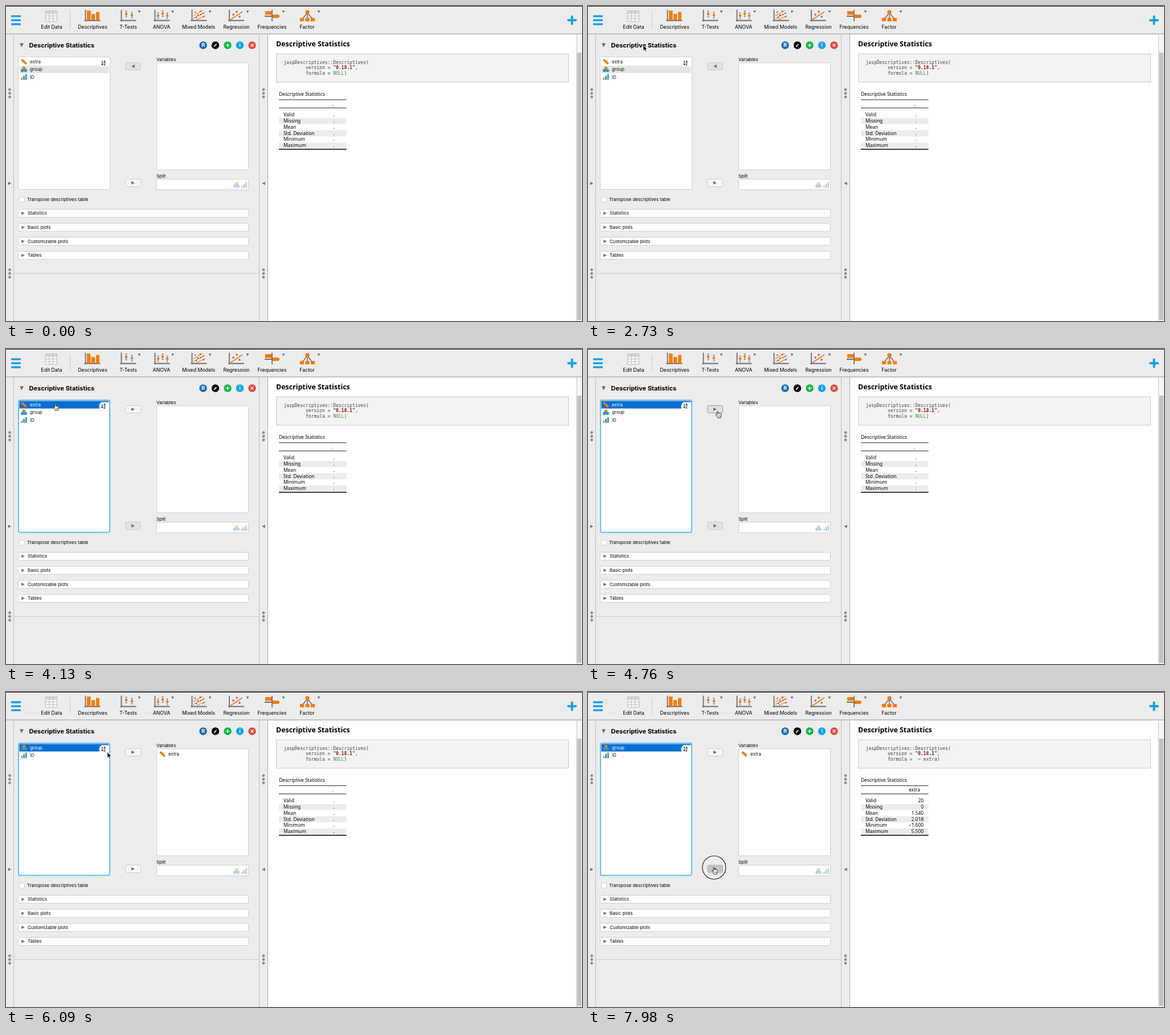
These frames come from a looping animation (1011 px wide and 554 px high, 8000 ms). An HTML page:

```html
<!DOCTYPE html>
<html lang="en">
<head>
<meta charset="utf-8">
<style>
  html, body { margin: 0; width: 100%; height: 100%; overflow: hidden; background: #ececec; }
  svg { display: block; }
  text { white-space: pre; }
  .ui { font: 7.9px Inter, sans-serif; }
  .tool { font: 8.8px Inter, sans-serif; text-anchor: middle; }
  .title { font: 700 11px Inter, sans-serif; }
  .out { font: 8.4px "Noto Sans", sans-serif; }
  .head { font: 700 12.4px "Noto Sans", sans-serif; }
  .code { font: 8px "DejaVu Sans Mono", monospace; fill: #444; }
  .num { text-anchor: end; }
</style>
</head>
<body>
<svg id="stage" width="1011" height="554" viewBox="0 0 1011 554"></svg>
<script>
const ORANGE = '#f57c0a', BLUE = '#14a1e3', GREY = '#6e6e6e';

const rect = (x, y, w, h, fill, extra = '') =>
  `<rect x="${x}" y="${y}" width="${w}" height="${h}" fill="${fill}" ${extra}/>`;
const box = (x, y, w, h, fill = '#fff', stroke = '#cfcfcf', r = 2) =>
  rect(x + .5, y + .5, w - 1, h - 1, fill, `stroke="${stroke}" rx="${r}"`);
const path = (d, stroke, width = 1, fill = 'none') =>
  `<path d="${d}" stroke="${stroke}" stroke-width="${width}" fill="${fill}"/>`;
const dot = (x, y, r, fill) => `<circle cx="${x}" cy="${y}" r="${r}" fill="${fill}"/>`;
const text = (x, y, s, cls = 'ui', extra = '') => `<text x="${x}" y="${y}" class="${cls}" ${extra}>${s}</text>`;
const group = (x, y, body, extra = '') => `<g transform="translate(${x} ${y})" ${extra}>${body}</g>`;
const fillPath = (d, fill) => path(d, 'none', 0, fill);
const right = (x, y, s = 3) => fillPath(`M${x - s} ${y - s}l${2 * s} ${s}l${-2 * s} ${s}z`, GREY);
const left = (x, y, s = 3) => fillPath(`M${x + s} ${y - s}l${-2 * s} ${s}l${2 * s} ${s}z`, GREY);
const down = (x, y, s) => fillPath(`M${x - s} ${y - s}h${2 * s}l${-s} ${2 * s}z`, GREY);

// Variable type icons, centred on the origin
const icons = {
  scale: group(0, 0, rect(-5.5, -1.9, 11, 3.8, ORANGE, 'rx=".5"') +
    path('M-3 -1.9v1.6M-1 -1.9v1.6M1 -1.9v1.6M3 -1.9v1.6', '#b85400', .6), 'transform-origin="0 0" style="rotate:42deg"'),
  nominal: dot(0, -2, 2.9, ORANGE) + dot(-2.6, 2, 2.8, '#57849f') + dot(2.6, 2, 2.8, BLUE),
  ordinal: rect(-5, 1, 2.6, 4, ORANGE) + rect(-1.4, -2, 2.8, 7, '#57849f') + rect(2.3, -5, 2.8, 10, BLUE)
};
const kinds = { extra: 'scale', group: 'nominal', ID: 'ordinal' };
const item = (x, y, name, color = '#111') =>
  group(x, y, icons[kinds[name]]) + text(x + (x < 100 ? 10.5 : 11), y + 2.9, name, 'ui', `fill="${color}"`);

// Toolbar
const axes = (x) => path(`M${x} 6.5V27M${x - 2} 25.5h28`, GREY, 1.8);
const errorBar = (x, y) => path(`M${x} ${y - 5}v10M${x - 1.5} ${y - 5}h3M${x - 1.5} ${y + 5}h3`, GREY, 1) + dot(x, y, 2.3, ORANGE);
const plusMark = (x, y) => path(`M${x - 2} ${y}h4M${x} ${y - 2}v4`, '#c0392b', 1.1);
const tools = [
  [80, 'Edit Data'], [152, 'Descriptives'], [214.5, 'T-Tests', 234], [273, 'ANOVA', 292.5],
  [338, 'Mixed Models', 358], [404.5, 'Regression', 424], [467, 'Frequencies', 487], [528.5, 'Factor', 549]
];
const toolbar =
  rect(0, 0, 1011, 49, '#ececec') + rect(0, 0, 1011, 1, '#222') + rect(0, 48.5, 1011, 1.2, '#a6a6a6') +
  path('M10.5 18h14M10.5 25h14M10.5 32h14', BLUE, 3.6).replace('/>', ' stroke-linecap="round"/>') +
  path('M987 25h13M993.5 18.5v13', BLUE, 4).replace('/>', ' stroke-linecap="round"/>') +
  path('M112.5 10v29', '#cbcbcb') +
  rect(70, 8.5, 19, 18.5, '#f8f8f8') + rect(70, 8.5, 19, 4, '#d8d8d8') +
  path('M69.5 8.5h20v18.5h-20zM69.5 13h20M69.5 17.5h20M69.5 22h20M76 8.5v18.5M82.5 8.5v18.5', '#bdbdbd', 1) +
  axes(139.5) + rect(142, 8, 6.5, 17, ORANGE) + rect(150, 14, 6, 11, ORANGE) + rect(158, 10.5, 6, 14.5, ORANGE) +
  axes(202.5) + errorBar(211, 14) + errorBar(221, 16) +
  axes(261.5) + errorBar(267, 17) + errorBar(275, 13.5) + errorBar(283, 17) +
  axes(326.5) + path('M329 17l16-9M329 22l20-11M334 24l16-7', ORANGE, 1.1) +
  path('M331 11h2M336 16h2M341 15h2M346 19h2M333 20h2M340 9h2M345 13h2', '#c0392b', 1.8) +
  axes(392) + path('M394 24l21-14', ORANGE, 1.8) + plusMark(399, 15) + plusMark(405, 10) + plusMark(410, 19) +
  path('M467 6.5v20.5M454 18h26', GREY, 1.8) + rect(455, 9, 11, 6.5, ORANGE) + rect(468, 15, 11, 6, ORANGE) +
  path('M529 12l-9 11M529 12v11M529 12l9 11', GREY, 1.6) + dot(529, 11, 3.7, ORANGE) +
  [516, 525.5, 535].map(x => rect(x, 21, 7, 6, ORANGE)).join('') +
  tools.map(([x, name, arrow]) => text(x, 39.5, name, 'tool') + (arrow ? down(arrow, 10.2, 2.3) : '')).join('');

// Left-hand form
const badge = (x, fill, mark) => dot(x, 69, 6.7, fill) + mark;
const letter = (x, s) => text(x, 72.4, s, 'title', 'fill="#fff" text-anchor="middle" style="font-size:9.5px"');
const grip = (x) => [147, 153.5, 160, 464, 470.5, 477].map(y => dot(x, y, 2.4, '#8e8e8e')).join('');
const form =
  path('M13.5 50V554M444.5 50V554', '#bdbdbd') + path('M459.5 50V554', '#a8a8a8') +
  grip(6.5) + grip(452) + right(6.5, 312, 2.7) + left(452, 312, 2.7) +
  down(27.5, 69, 3.5) + text(40.5, 73, 'Descriptive Statistics', 'title') +
  badge(346, '#1268b3', letter(346, 'R')) +
  badge(367.5, '#000', path('M365.2 71.4l4.2-4.4', '#fff', 1.8)) +
  badge(389, '#00b53f', path('M385.5 69h7M389 65.5v7', '#fff', 1.7)) +
  badge(410.5, '#0aa2f5', letter(410.5, 'i')) +
  badge(432, '#e0483a', path('M429.5 66.5l5 5M434.5 66.5l-5 5', '#fff', 1.3)) +
  text(264, 96.8, 'Variables') + box(264, 99.5, 162, 189) +
  text(264, 301.5, 'Split') + box(264, 304, 162, 19.5) +
  group(404.5, 315, icons.nominal, 'opacity=".4"') + group(418, 315, icons.ordinal, 'opacity=".4"') +
  box(23, 335.5, 10, 10) + text(37, 343.2, 'Transpose descriptives table') +
  ['Statistics', 'Basic plots', 'Customizable plots', 'Tables'].map((name, i) => {
    const y = 364.5 + i * 24.7;
    return box(21, y - 7.5, 405, 15) + right(30, y, 2.8) + text(38, y + 2.8, name);
  }).join('') +
  path('M14 470.5H444', '#cfcfcf');

// Results page
const labels = ['Valid', 'Missing', 'Mean', 'Std. Deviation', 'Minimum', 'Maximum'];
const values = ['20', '0', '1.540', '2.018', '−1.600', '5.500'];
const rowY = (i) => 194.4 + i * 10.75;
const page =
  rect(460, 50, 541, 504, '#fff') + rect(1001, 50, 10, 504, '#f4f4f4') + path('M1001.5 50V554', '#c9c9c9') +
  rect(1002.5, 82, 7.5, 470, '#c2c2c2') +
  text(474, 70.8, 'Descriptive Statistics', 'head') +
  box(474, 83.5, 514, 51, '#f3f3f3', '#cbcbcb', 0) +
  text(487.5, 102, 'jaspDescriptives::Descriptives(', 'code') +
  text(526, 111.3, 'version = <tspan fill="#8b1a1a" font-weight="700">"0.18.1"</tspan>,', 'code') +
  text(479, 158.3, 'Descriptive Statistics', 'out') +
  [1, 3, 5].map(i => rect(479, rowY(i) - 8.2, 118.5, 10.75, '#ececec')).join('') +
  path('M479 164.8h118.5M479 179.2h118.5', '#222', 1) + path('M479 252h118.5', '#000', 1.5) +
  labels.map((s, i) => text(487, rowY(i), s, 'out')).join('');

const results = (filled) =>
  text(526, 120.8, filled ? 'formula =  ~ extra)' : 'formula = <tspan fill="#3c9a3c">NULL</tspan>)', 'code') +
  text(573, 175.3, filled ? 'extra' : '.', 'out', 'text-anchor="middle"') +
  values.map((s, i) => filled ? text(589, rowY(i), s, 'out num') : text(574.3, rowY(i), '.', 'out')).join('');

function variableList(names, selected, focused, hovered) {
  const rows = names.map((name, i) => {
    const y = 98 + i * 13.4, on = name === selected;
    const fill = on ? (focused ? '#0a6ed1' : '#e4e4e4') : name === hovered ? '#ececec' : '#fff';
    return rect(23.5, y - 6.5, 157, 13.2, fill) + item(31.5, y, name, on && focused ? '#fff' : '#111');
  }).join('');
  const frame = focused
    ? rect(22, 90, 160, 232.5, 'none', 'stroke="#62bdf8" stroke-width="2" rx="2.5"')
    : rect(21.5, 89.5, 161, 233, 'none', 'stroke="#cfcfcf" rx="2"');
  const sort = `<path d="M164 97.5a7.5 7.5 0 0 1 4-4h13v11a7.5 7.5 0 0 1 -3 2h-11a7.5 7.5 0 0 1 -3 -9z" fill="#fff"/>` +
    path('M169 96v8M167.4 102l1.6 2l1.6-2', '#111', 1) +
    text(171.3, 99.8, 'A', 'title', 'style="font-size:5px"') + text(171.3, 104.8, 'Z', 'title', 'style="font-size:5px"');
  return rect(21.5, 89.5, 161, 233, '#fff', 'rx="2"') + rows + sort + frame;
}

const looks = {
  normal: ['#f6f6f8', '#cdcdcd'], disabled: ['#e2e2e2', '#cacaca'],
  hover: ['#e0e0e0', '#9a9a9a'], pressed: ['#c4c4c4', '#b4b4b4']
};
const button = (y, look, arrow = right) => box(209.5, y - 7, 27.5, 14, ...looks[look]) + arrow(223, y, 2.9);

// Pointer path: time, x, y
const stops = [
  [910, 181, 359], [980, 146, 232], [1260, 146, 232], [1890, 89, 105], [2170, 89, 105],
  [2730, 97, 69], [2800, 97, 69], [3220, 86, 87], [3290, 86, 87], [3360, 84.5, 90.5],
  [3500, 84.5, 90.5], [3710, 86.5, 96.5], [4130, 86.5, 96.5], [4340, 240, 118], [4480, 240, 118],
  [4830, 226.5, 108.5], [5810, 226.5, 108.5], [6440, 110, 102.5], [6580, 105, 98], [6930, 105, 98],
  [7140, 237, 262], [7280, 237, 262], [7700, 221.3, 308.7], [8000, 221.3, 308.7]
];
function pointerAt(t) {
  const i = stops.findIndex(s => s[0] > t);
  const [t0, x0, y0] = stops[i - 1], [t1, x1, y1] = stops[i];
  const k = (t - t0) / (t1 - t0), e = k * k * (3 - 2 * k);
  return [x0 + (x1 - x0) * e, y0 + (y1 - y0) * e];
}
const within = (t, ...spans) => spans.some(([a, b]) => t >= a && t < b);
const arrowShape = path('M0 0V9.8L2.3 7.7L3.9 11.3L5.5 10.6L4 7.1H7z', '#fff', .7, '#000');
const handShape = path('M-1.1 .9C-1.1 -.3 .8 -.3 .8 .9V4C1.2 3.2 2.5 3.3 2.7 4.2C3.2 3.6 4.3 3.8 4.4 4.7' +
  'C5 4.3 6 4.7 6 5.6V7.8C6 9.3 5 10 5 11.6H-.4C-.6 9.9 -2.7 8.2 -3.5 6.4C-3.8 5.3 -2.5 5 -1.9 5.8L-1.1 6.8z', '#111', .9, '#fff') +
  path('M1.1 7.2v2.5M2.7 7.2v2.5M4.2 7.2v2.5', '#111', .6);

function pointer(t) {
  if (t < 910) return '';
  const [x, y] = pointerAt(t);
  const isArrow = t < 3360 || within(t, [4200, 4620], [5950, 6300], [7000, 7420]);
  const clicking = within(t, [3850, 3920], [5600, 5670], [6650, 6720], [7980, 8000]);
  return group(x, y, (isArrow ? arrowShape : handShape) +
    (clicking ? '<circle r="20.5" fill="none" stroke="#111" stroke-width="1.1"/>' : ''));
}

function scene(t) {
  const moved = t >= 5810, picked = t >= 3850;
  const names = moved ? ['group', 'ID'] : ['extra', 'group', 'ID'];
  const selected = picked && !moved ? 'extra' : 'group';
  const hovered = within(t, [3570, 3850]) ? 'extra' : '';
  const top = t < 3080 ? 'disabled' : within(t, [5600, 5670]) ? 'pressed' : within(t, [4620, 5950]) ? 'hover' : 'normal';
  const bottom = t >= 7980 ? 'pressed' : t >= 7420 ? 'hover' : picked && !moved ? 'disabled' : 'normal';
  return variableList(names, selected, picked, hovered) +
    button(106, top, t < 3080 ? left : right) + button(311, bottom) +
    (moved ? item(274.5, 109, 'extra').replace('x="285.5"', 'x="285"') : '') +
    results(t >= 6160) + pointer(t);
}

stage.innerHTML = rect(0, 0, 1011, 554, '#ececec') + form + page + toolbar + '<g id="live"></g>';
const live = document.getElementById('live'), TICK = 70;
let shown = -1;
function frame() {
  const t = Math.floor(performance.now() % 8000 / TICK) * TICK;
  if (t !== shown) live.innerHTML = scene(shown = t);
  requestAnimationFrame(frame);
}
frame();
</script>
</body>
</html>
```
